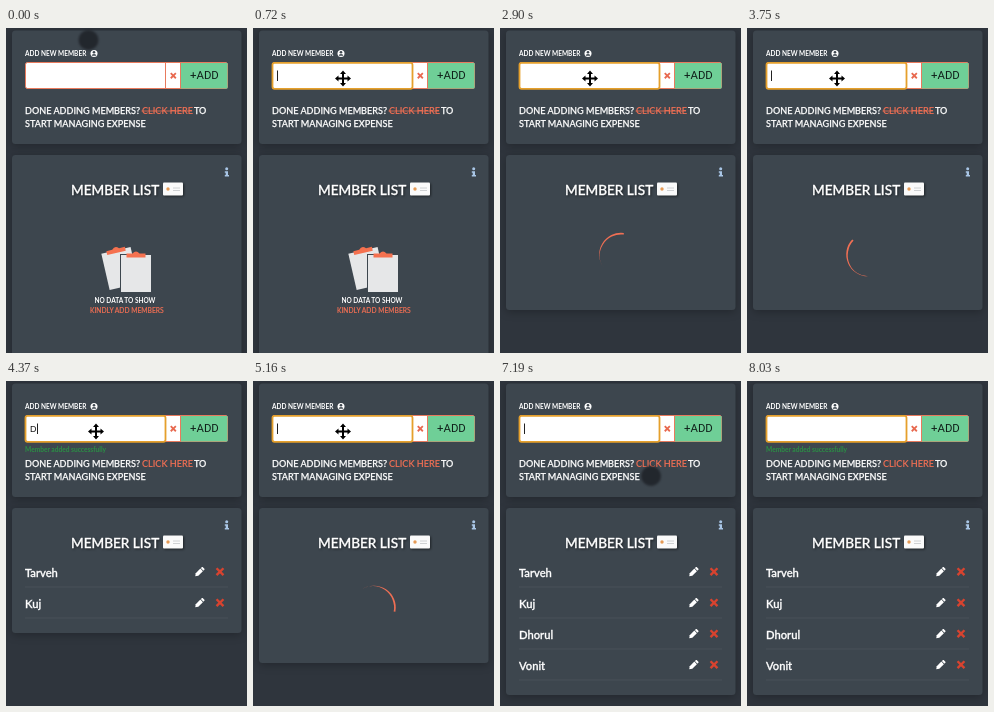
Recreate the animation shown at these times as an HTML page. Size 241 by 325 pixels, loop 8.11 s.

```html
<!DOCTYPE html>
<html lang="en">
<head>
<meta charset="utf-8">
<title>Member list</title>
<style>
  html, body { margin: 0; width: 100%; height: 100%; overflow: hidden; background: #2f353d; }
  svg { display: block; width: 241px; height: 325px; }
  text { font-family: Lato, "Open Sans", sans-serif; fill: #fff; }
  .card { fill: #3d464e; filter: drop-shadow(0 2px 4px rgba(0, 0, 0, .25)); }
  .small { font-size: 6.5px; font-weight: 700; }
  .body { font-size: 9.1px; font-weight: 500; stroke: #fff; stroke-width: .25px; }
  .title { font-size: 13.6px; font-weight: 500; stroke: #fff; stroke-width: .35px; filter: drop-shadow(1px 1px 1px rgba(0, 0, 0, .5)); }
  .name { font-size: 11.2px; font-weight: 500; stroke: #fff; stroke-width: .35px; }
  .field { font: 9px "Liberation Sans", Arial, sans-serif; fill: #111; }
  .add { font: 11.4px Roboto, "Liberation Sans", sans-serif; fill: #10201a; }
  text.coral { fill: #f06f54; stroke: #f06f54; stroke-width: .15px; }
  text.small.coral { font-weight: 500; font-size: 6.7px; }
  text.note { font-size: 6.6px; font-weight: 700; fill: #2b8f45; }
</style>
</head>
<body>
<svg viewBox="0 0 241 325">
  <defs>
    <path id="cross" d="M-3 -3L3 3M3 -3L-3 3" fill="none" stroke-width="2.100"/>
    <g id="row">
      <path d="M19 14.5H222" stroke="#485159"/>
      <g transform="translate(193.500 -.5) rotate(45)" fill="#fff">
        <path d="M-1.800 -3H1.800V3.500L0 6L-1.800 3.500Z"/>
        <rect x="-1.800" y="-5.700" width="3.600" height="2" rx=".6"/>
      </g>
      <use href="#cross" transform="translate(214 -.8) scale(1.15)" stroke="#d8432f"/>
    </g>
    <g id="sheet">
      <rect x="-15" y="-18" width="30" height="37" fill="#e6e7e8"/>
      <path d="M-9.500 -15.500V-19.500H-3.500Q0 -23.500 3.500 -19.500H9.500V-15.500Z" fill="#f5714f"/>
    </g>
  </defs>

  <rect width="241" height="325" fill="#2f353d"/>
  <rect class="card" x="6" y="2.500" width="229.500" height="113.500" rx="3.500"/>
  <rect class="card" id="list" x="6" y="127" width="229.500" height="210" rx="3.500"/>

  <text class="small" x="19" y="27.800">ADD NEW MEMBER</text>
  <circle cx="88" cy="25.500" r="3.500" fill="#fff"/>
  <circle cx="88" cy="24.300" r="1.300" fill="#3d464e"/>
  <path d="M85.700 27.800a2.300 1.900 0 0 1 4.600 0z" fill="#3d464e"/>

  <rect x="19.500" y="34.500" width="202" height="26" rx="2" fill="#fff" stroke="#e87a5d"/>
  <rect x="175" y="35" width="46.500" height="25.500" fill="#6fcf97"/>
  <path d="M159.500 35V60M174.500 35V60" stroke="#e87a5d"/>
  <use href="#cross" transform="translate(167.300 47.700) scale(.85)" stroke="#e8694f"/>
  <text class="add" x="184" y="51.300">+ADD</text>
  <rect id="focus" x="19.500" y="34.800" width="140" height="26" rx="2" fill="#fff" stroke="#e5a02c" stroke-width="1.800"/>
  <text class="field" id="typed" x="24" y="51"></text>
  <path id="caret" d="M0 42.500V53" stroke="#222"/>
  <text class="note" id="note" x="19" y="70.800">Member added successfully</text>

  <text class="body" x="19" y="86">DONE ADDING MEMBERS?</text>
  <text class="body coral" x="136" y="86">CLICK HERE</text>
  <path id="strike" d="M135.500 83H186" stroke="#f06f54" stroke-width=".8"/>
  <text class="body" x="188" y="86">TO</text>
  <text class="body" x="19" y="98.700">START MANAGING EXPENSE</text>

  <g fill="#a9c6e6">
    <circle cx="220.700" cy="140.800" r="1.500"/>
    <path d="M218.800 143.200H222V147H223V148.500H218.800V147H219.700V144.700H218.800Z"/>
  </g>
  <text class="title" x="65" y="166.800">MEMBER LIST</text>
  <rect x="157" y="154.500" width="20" height="13" rx="1" fill="#fafafa" style="filter:drop-shadow(1px 1px 1px rgba(0,0,0,.5))"/>
  <circle cx="162" cy="161" r="1.700" fill="#e59a55"/>
  <path d="M167 160H174M167 162.500H174" stroke="#c4c7ca" stroke-width=".8"/>

  <g id="empty">
    <use href="#sheet" transform="translate(114 240) rotate(-13)"/>
    <rect x="114" y="226" width="32" height="39" fill="#3d464e"/>
    <use href="#sheet" transform="translate(130 245)"/>
    <text class="small" x="88.500" y="274.800">NO DATA TO SHOW</text>
    <text class="small coral" x="84" y="285">KINDLY ADD MEMBERS</text>
  </g>
  <path id="spinner" d="M-21.800 0A21.800 21.800 0 0 1 15.400 -15.400L14.400 -14A21 20.200 0 0 0 -21.800 0Z" fill="#f06f54"/>
  <g id="rows"></g>

  <circle id="dot" r="10" fill="#20242a" opacity=".9" style="filter:blur(.8px)"/>
  <path id="move" d="M0 -8L3 -4.500H1V-1H4.500V-3L8 0L4.500 3V1H1V4.500H3L0 8L-3 4.500H-1V1H-4.500V3L-8 0L-4.500 -3V-1H-1V-4.500H-3Z" stroke="#fff" stroke-width="1.200" stroke-linejoin="round" paint-order="stroke"/>
</svg>

<script>
const LOOP = 8110;
const FOCUS_AT = 720;
const names = ['Tarveh', 'Kuj', 'Dhorul', 'Vonit'];

// Key press times for each name, and when the field is submitted
const typing = [
  { keys: [1340, 1500, 1980, 2130, 2280, 2520], submit: 2600 },
  { keys: [3140, 3290, 3440], submit: 3600 },
  { keys: [4370, 4450, 4610, 4680, 4760, 4930], submit: 5010 },
  { keys: [5700, 5870, 5940, 6030, 6110], submit: 6340 }
];
const loading = [[2600, 4220], [5010, 5470], [6340, 6880]];
const notes = [[4300, 4930], [5550, 5870], [7570, LOOP]];
const counts = [[0, 0], [4220, 2], [5470, 3], [6880, 4]];

// Pointer stops: time, x, y
const stops = [[0, 82.5, 12], [70, 82.5, 12], [490, 90, 50.5], [6640, 90, 50.5], [7190, 151, 95], [7270, 151, 95], [7490, 162, 85]];
const POINTER_END = 7570;

const $ = id => document.getElementById(id);
const show = (id, on) => $(id).setAttribute('visibility', on ? 'visible' : 'hidden');
const within = (spans, t) => spans.some(([from, to]) => t >= from && t < to);

const svgNode = (tag, attrs, parent) => {
  const node = document.createElementNS('http://www.w3.org/2000/svg', tag);
  for (const key in attrs) node.setAttribute(key, attrs[key]);
  return parent.appendChild(node);
};

const rows = names.map((name, i) => {
  const row = svgNode('g', { transform: `translate(0 ${191.5 + 31 * i})` }, $('rows'));
  svgNode('use', { href: '#row' }, row);
  svgNode('text', { class: 'name', x: 19, y: 4 }, row).textContent = name;
  return row;
});

function pointerAt(t) {
  const i = stops.findIndex(stop => stop[0] > t);
  if (i < 0) return stops[stops.length - 1].slice(1);
  const [t0, x0, y0] = stops[i - 1], [t1, x1, y1] = stops[i];
  const p = (t - t0) / (t1 - t0), e = p * p * (3 - 2 * p);
  return [x0 + (x1 - x0) * e, y0 + (y1 - y0) * e];
}

function drawField(t) {
  const entry = typing.findIndex(({ keys, submit }) => t >= keys[0] && t < submit);
  const value = entry < 0 ? '' : names[entry].slice(0, typing[entry].keys.filter(k => k <= t).length);
  const idleFrom = Math.max(FOCUS_AT, ...typing.map(e => e.submit).filter(s => s <= t));
  const focused = t >= FOCUS_AT;
  if ($('typed').textContent !== value) $('typed').textContent = value;
  show('focus', focused);
  show('caret', focused && (value || (t - idleFrom) % 640 < 240));
  const end = value ? $('typed').getComputedTextLength() : 0;
  $('caret').setAttribute('transform', `translate(${Math.round(24 + end) + .5} 0)`);
}

function drawList(t) {
  const busy = within(loading, t);
  const count = counts.filter(([from]) => from <= t).pop()[1];
  const bottom = busy ? 282 : count ? 190 + 31 * count : 337;
  $('list').setAttribute('height', bottom - 127);
  rows.forEach((row, i) => row.setAttribute('visibility', !busy && i < count ? 'visible' : 'hidden'));
  show('empty', !busy && !count);
  show('strike', count < 2);
  show('spinner', busy);
  $('spinner').setAttribute('transform', `translate(121 226.500) rotate(${322 + (t - 2900) * .36})`);
}

function drawPointer(t) {
  const [x, y] = pointerAt(t);
  const overField = y > 40 && y < 61;
  show('dot', !overField && t < POINTER_END);
  show('move', overField && t < POINTER_END);
  for (const id of ['dot', 'move']) $(id).setAttribute('transform', `translate(${x} ${y})`);
}

function render(t) {
  drawField(t);
  drawList(t);
  drawPointer(t);
  show('note', within(notes, t));
}

const start = performance.now();
function tick() {
  render((performance.now() - start) % LOOP);
  requestAnimationFrame(tick);
}
tick();
</script>
</body>
</html>
```
